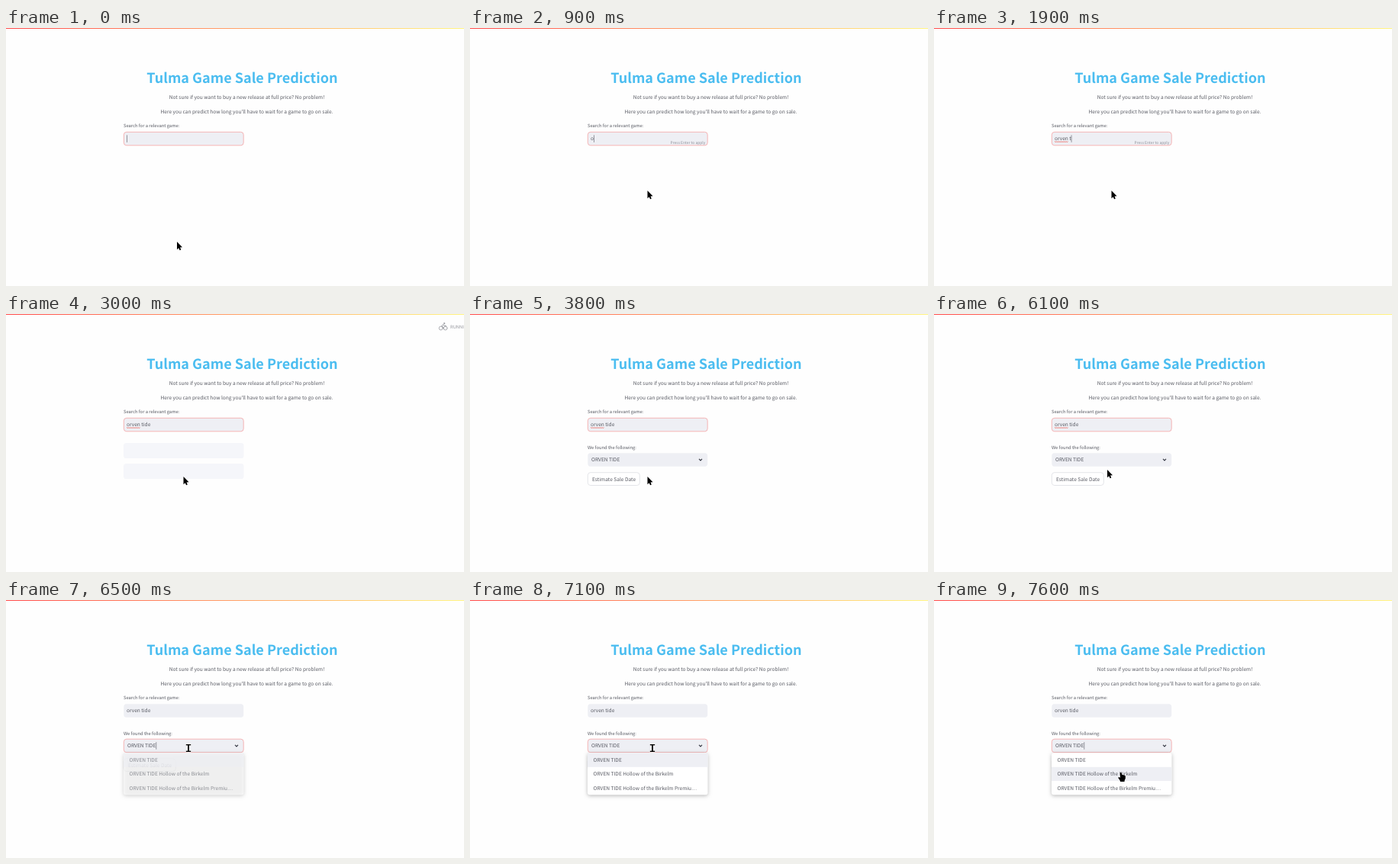
Recreate the animation shown at these times as an HTML page with a canvas. Size 600 by 338 pixels, loop 8 s.

```html
<!DOCTYPE html>
<html lang="en">
<head>
<meta charset="utf-8">
<title>Game Sale Prediction</title>
<style>
html, body { margin: 0; width: 100%; height: 100%; overflow: hidden; background: #fefefe; }
canvas { display: block; width: 600px; height: 338px; }
</style>
</head>
<body>
<canvas id="stage"></canvas>
<script>
const W = 600, H = 338, LOOP = 8000, STEP = 100;
const FONT = '"Noto Sans CJK JP", "Noto Sans CJK SC", "Noto Sans CJK", "Open Sans", sans-serif';
const INK = '#565861', RED = '#ff4b4b', FIELD = '#eeeff4', FOCUS = '#f59a9a';
const BODY = 6.58, LABEL = 5.8, HINT = 4.95;
const QUERY = 'orven tide', GAME = 'ORVEN TIDE';
const OPTIONS = [GAME, GAME + ' Hollow of the Birkelm', GAME + ' Hollow of the Birkelm Premiu…'];
const LEFT = 154, WIDTH = 157.5;

// time at which each letter of the query appears
const KEYS = [800, 1100, 1200, 1300, 1300, 1500, 1900, 2100, 2100, 2200];
const ENTER = 2400, FOUND = 3200, OPEN = 6500;

// pointer path: time, x, y
const PATH = [
  [0, 224, 280], [200, 232.5, 213], [4400, 232.5, 213], [4600, 241, 212.5],
  [5000, 241, 212.5], [5300, 214, 212], [5500, 214, 211], [5700, 224, 207],
  [6000, 224, 207], [6100, 227, 204], [6400, 239, 194], [7200, 239, 194], [7600, 245, 226]
];

const canvas = document.getElementById('stage');
const dpr = window.devicePixelRatio || 1;
canvas.width = W * dpr;
canvas.height = H * dpr;
const c = canvas.getContext('2d');
c.textRendering = 'geometricPrecision';

const clamp = v => Math.max(0, Math.min(1, v));
const ramp = (t, a, b) => clamp((t - a) / (b - a));

function text(str, x, y, size, color = INK, align = 'left', weight = 400) {
  c.font = `${weight} ${size}px ${FONT}`;
  c.textAlign = align;
  c.fillStyle = color;
  c.fillText(str, x, y);
  return c.measureText(str).width;
}

function box(x, y, w, h, fill, line, r = 3.6) {
  c.beginPath();
  c.roundRect(x, y, w, h, r);
  if (fill) { c.fillStyle = fill; c.fill(); }
  if (line) { c.strokeStyle = line; c.lineWidth = 0.7; c.stroke(); }
}

function strokeLine(points, color, width) {
  c.beginPath();
  points.forEach(([x, y]) => c.lineTo(x, y));
  c.strokeStyle = color;
  c.lineWidth = width;
  c.stroke();
}

function caret(x, y) {
  c.fillStyle = INK;
  c.fillRect(x, y, 0.6, 9.5);
}

function pointerAt(t) {
  let i = PATH.length - 1;
  while (PATH[i][0] > t) i--;
  const a = PATH[i], b = PATH[i + 1] || a;
  const k = b === a ? 0 : ramp(t, a[0], b[0]);
  return { x: a[1] + (b[1] - a[1]) * k, y: a[2] + (b[2] - a[2]) * k };
}

function drawPage() {
  c.fillStyle = '#fefefe';
  c.fillRect(0, 0, W, H);
  const g = c.createLinearGradient(0, 0, W, 0);
  g.addColorStop(0, RED);
  g.addColorStop(1, '#fff380');
  c.fillStyle = g;
  c.fillRect(0, 0, W, 1);
  text('Tulma Game Sale Prediction', 184.3, 72.4, 18.07, '#4bbdf0', 'left', 700);
  text('Not sure if you want to buy a new release at full price? No problem!', 315.5, 93, BODY, INK, 'center');
  text("Here you can predict how long you'll have to wait for a game to go on sale.", 315.5, 112.3, BODY, INK, 'center');
  text('Search for a relevant game:', LEFT, 130.4, LABEL);
}

function searchCaret(t) {
  if (t < 800) return t < 400;
  if (t < 2800) return true;
  if (t < 5300) return Math.floor((t - 2800) / 500) % 2 === 1;
  return t < 5900 || t >= 6300;
}

function drawSearch(t) {
  const focused = t < OPEN;
  box(LEFT + 0.3, 136.3, WIDTH - 0.6, 17.5, FIELD, focused && FOCUS);
  const n = KEYS.filter(k => k <= t).length;
  const w = text(QUERY.slice(0, n), 158, 147.4, BODY);
  if (n >= 6 && focused) {
    const end = 158 + c.measureText(QUERY.slice(0, 5)).width, wave = [];
    for (let x = 158; x <= end; x += 0.5) wave.push([x, 149.1 + 0.35 * Math.sin(x * 3)]);
    strokeLine(wave, '#e8453c', 0.7);
  }
  if (focused && searchCaret(t)) caret(158 + w, 140.3);
  if (t >= 800 && t < ENTER) text('Press Enter to apply', 308.3, 151.8, HINT, '#8d8f98', 'right');
}

function drawRunning(t) {
  c.save();
  c.globalAlpha = ramp(t, 2400, 2800);
  c.lineCap = c.lineJoin = 'round';
  const ink = '#96979d', spin = t / 160;
  for (const x of [569.7, 575.7]) {
    c.beginPath();
    c.arc(x, 18.6, 2.4, 0, 7);
    c.strokeStyle = ink;
    c.lineWidth = 0.8;
    c.stroke();
  }
  c.beginPath();
  c.arc(574.2, 12.3, 1.1, 0, 7);
  c.fillStyle = ink;
  c.fill();
  strokeLine([[576.5, 15.6], [574.4, 15.4], [572.9, 13.8], [570.6, 15.7], [572.7, 17.2],
    [572.7 + 0.5 * Math.cos(spin), 19.4 + 0.5 * Math.sin(spin)]], ink, 1);
  text('RUNNING...', 582, 18.7, 5.8, ink);
  c.restore();
}

function drawSkeletons(t) {
  c.save();
  c.globalAlpha = ramp(t, 2500, 2900);
  box(LEFT, 169, WIDTH, 20, '#f5f6fa');
  box(LEFT, 196, WIDTH, 20, '#f5f6fa');
  c.restore();
}

function drawResult(t, p) {
  const open = t >= OPEN;
  text('We found the following:', LEFT, 176.6, LABEL);
  box(LEFT + 0.3, 182.2, WIDTH - 0.6, 17.5, FIELD, open && FOCUS);
  const w = text(GAME, 159, 193.3, BODY);
  if (open && (t < 7100 || t >= 7600)) caret(159.3 + w, 186.2);
  strokeLine([[300, 189.8], [302, 191.9], [304, 189.8]], '#31333f', 1.1);

  const hover = overButton(p);
  box(154.3, 207.7, 68, 16.8, '#fff', hover ? RED : '#d9dae0');
  text('Estimate Sale Date', 160, 218.6, BODY, hover ? RED : INK);

  if (open) drawMenu(ramp(t, OPEN - 200, OPEN + 100), p);
}

function drawMenu(alpha, p) {
  c.save();
  c.globalAlpha = alpha;
  c.shadowColor = 'rgba(0,0,0,.28)';
  c.shadowBlur = 5 * dpr;
  c.shadowOffsetY = 1.2 * dpr;
  box(LEFT, 200.3, WIDTH, 55, '#fff', null, 3);
  c.shadowColor = 'transparent';
  const active = p.y < 219 ? 0 : 1;
  OPTIONS.forEach((name, i) => {
    const y = 200.5 + i * 18.3;
    if (i === active) {
      c.fillStyle = FIELD;
      c.fillRect(LEFT, y, WIDTH, 18.3);
    }
    text(name, 161.5, y + 11.5, BODY);
  });
  c.restore();
}

const overButton = p => p.x > 154 && p.x < 222.5 && p.y > 207.5 && p.y < 224.5;
const overSelect = p => p.x > 154 && p.x < 312 && p.y > 182 && p.y < 200;

function arrow() {
  c.beginPath();
  [[0, 0], [0, 10.2], [2.2, 8.2], [3.6, 11.2], [5.3, 10.4], [4, 7.5], [7, 7.2]]
    .forEach(([x, y]) => c.lineTo(x, y));
  c.closePath();
  c.strokeStyle = '#fff';
  c.lineWidth = 0.8;
  c.stroke();
  c.fillStyle = '#000';
  c.fill();
}

function beam() {
  for (const [color, d] of [['#fff', 0.5], ['#000', 0]]) {
    c.fillStyle = color;
    c.fillRect(-0.9 - d, -5 - d, 1.8 + 2 * d, 10 + 2 * d);
    for (const y of [-5, 3.6]) c.fillRect(-3.2 - d, y - d, 6.4 + 2 * d, 1.4 + 2 * d);
  }
}

function hand() {
  c.beginPath();
  c.moveTo(-1.5, 0.8);
  c.quadraticCurveTo(-0.4, -1, 0.9, 0.8);
  c.lineTo(1.3, 3);
  c.quadraticCurveTo(5.6, 3, 5.9, 5.2);
  c.quadraticCurveTo(6.2, 8.4, 4.7, 10.2);
  c.lineTo(4.5, 12);
  c.lineTo(-0.8, 12);
  c.quadraticCurveTo(-1.4, 9.8, -3.6, 7.2);
  c.quadraticCurveTo(-3.6, 5.2, -1, 6.8);
  c.closePath();
  c.strokeStyle = '#fff';
  c.lineWidth = 0.9;
  c.stroke();
  c.fillStyle = '#000';
  c.fill();
}

function drawPointer(t, p) {
  const found = t >= FOUND, menu = t >= OPEN && p.y >= 200;
  c.save();
  c.translate(p.x, p.y);
  if (found && overSelect(p)) beam();
  else if (menu || (found && overButton(p))) hand();
  else arrow();
  c.restore();
}

function draw(now) {
  const t = Math.floor((now % LOOP) / STEP) * STEP;
  const p = pointerAt(t);
  c.setTransform(dpr, 0, 0, dpr, 0, 0);
  drawPage();
  drawSearch(t);
  if (t >= ENTER && t < FOUND) {
    drawRunning(t);
    drawSkeletons(t);
  }
  if (t >= FOUND) drawResult(t, p);
  drawPointer(t, p);
}

let start = null;
function tick() {
  const now = performance.now();
  if (start === null) start = now;
  draw(now - start);
  requestAnimationFrame(tick);
}
tick();
</script>
</body>
</html>
```
